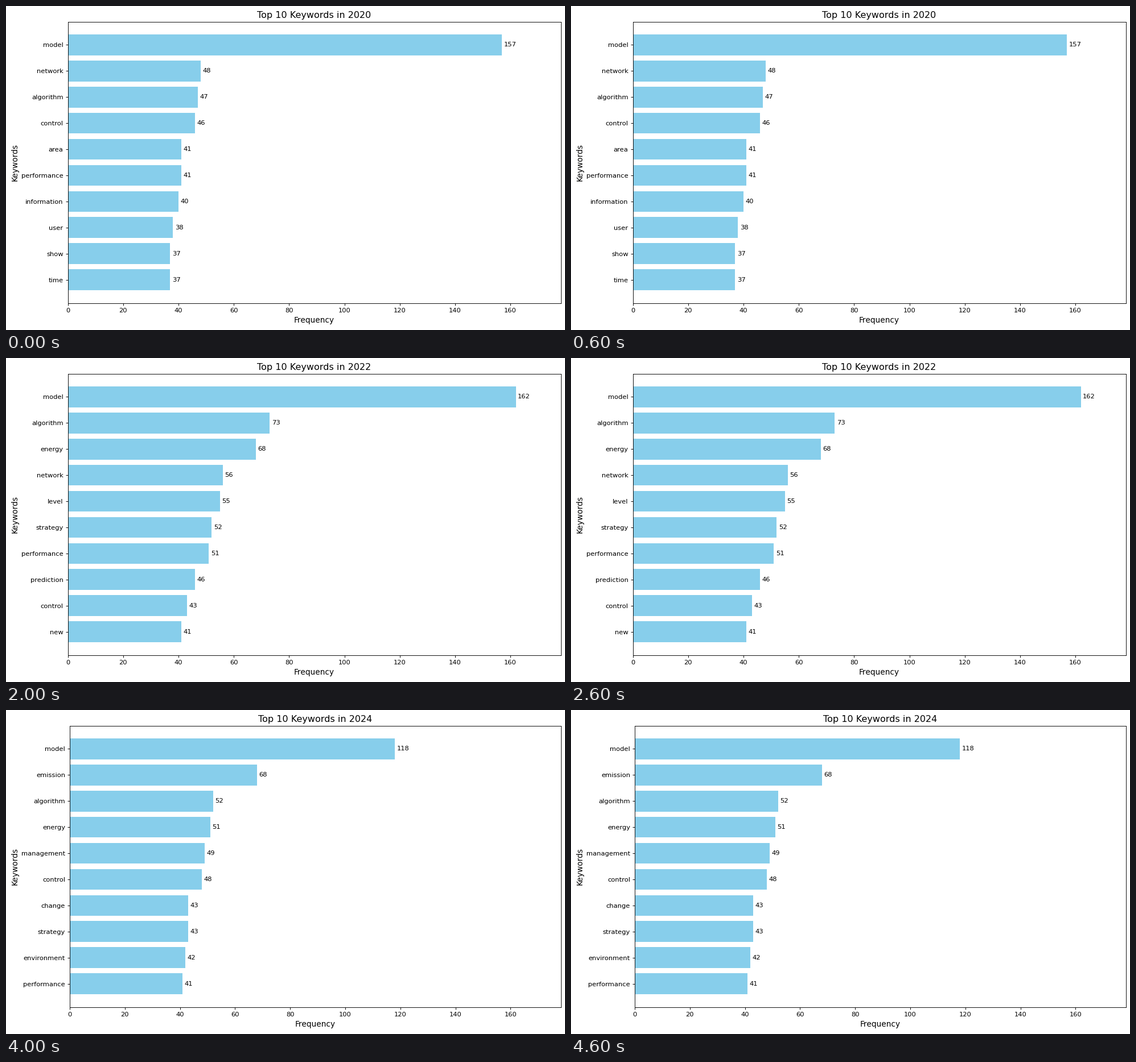
Recreate the animation shown at these times as a matplotlib script. Size 982 by 570 pixels, loop 5 s.

```python
import matplotlib.pyplot as plt
from matplotlib.animation import FuncAnimation

W, H, DPI = 982, 570, 82.5
RIGHT, TOP, BOTTOM = 974.5, 27.5, 522.5  # axes edges in pixels
plt.rcParams["font.family"] = "DejaVu Sans"

YEARS = {
    2020: "model 157, network 48, algorithm 47, control 46, area 41, "
          "performance 41, information 40, user 38, show 37, time 37",
    2021: "model 127, algorithm 55, area 47, new 46, network 45, "
          "health 42, performance 42, rate 38, forest 36, factor 35",
    2022: "model 162, algorithm 73, energy 68, network 56, level 55, "
          "strategy 52, performance 51, prediction 46, control 43, new 41",
    2023: "model 150, algorithm 56, change 47, climate 46, prediction 46, "
          "strategy 43, agricultural 41, carbon 41, network 41, robot 40",
    2024: "model 118, emission 68, algorithm 52, energy 51, management 49, "
          "control 48, change 43, strategy 43, environment 42, performance 41",
}


def parse(text):
    pairs = [item.split() for item in text.split(", ")]
    return [word for word, _ in pairs], [int(n) for _, n in pairs]


DATA = [(year, *parse(text)) for year, text in YEARS.items()]
X_MAX = 1.1 * max(max(counts) for _, _, counts in DATA)

fig, ax = plt.subplots(figsize=(W / DPI, H / DPI), dpi=DPI)


def draw(i):
    year, words, counts = DATA[i]
    ax.clear()
    bars = ax.barh(words, counts, color="skyblue")
    ax.bar_label(bars, padding=3, fontsize=10)
    ax.invert_yaxis()
    ax.set_xlim(0, X_MAX)
    ax.set_xlabel("Frequency", fontsize=12, labelpad=5)
    ax.set_ylabel("Keywords", fontsize=12)
    ax.set_title(f"Top 10 Keywords in {year}", fontsize=14)
    # the left margin follows the longest word, the other edges stay put
    fig.tight_layout(pad=0.72)
    fig.subplots_adjust(right=RIGHT / W, top=1 - TOP / H, bottom=1 - BOTTOM / H)
    return ax.get_children()


anim = FuncAnimation(fig, draw, frames=len(DATA), init_func=lambda: [],
                     interval=1000, repeat=True, repeat_delay=0)
plt.show()
```
